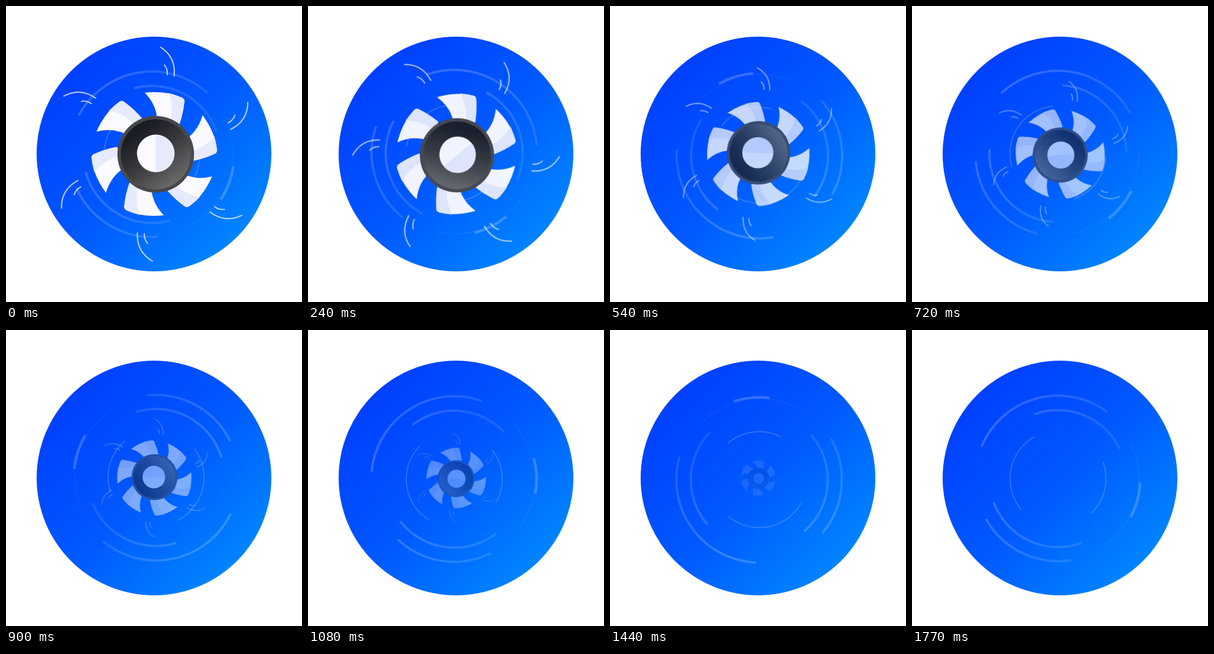
An HTML page for the animation above (1800 ms loop, 512x512 px).

```html
<!DOCTYPE html>
<html lang="en">
<head>
<meta charset="utf-8">
<title>Spinning fan</title>
<style>
  html, body { margin: 0; width: 100%; height: 100%; overflow: hidden; background: #fff; }
  svg { display: block; width: 100vw; height: 100vh; }
  .line { fill: none; stroke: #fff; }
</style>
</head>
<body>
<svg viewBox="0 0 512 512">
  <defs>
    <linearGradient id="sky" x1="0" y1="0" x2="1" y2="1">
      <stop offset="0" stop-color="#0036ff"/>
      <stop offset=".5" stop-color="#0058ff"/>
      <stop offset="1" stop-color="#0096ff"/>
    </linearGradient>
    <linearGradient id="fade" gradientUnits="userSpaceOnUse" x1="-144" y1="-30" x2="130" y2="30">
      <stop offset="0" stop-color="#fff" stop-opacity=".2"/>
      <stop offset="1" stop-color="#fff" stop-opacity=".08"/>
    </linearGradient>
    <linearGradient id="bowl" x1=".2" y1=".1" x2=".8" y2=".9">
      <stop offset=".1" stop-color="#1b1d25"/>
      <stop offset=".5" stop-color="#38393c"/>
      <stop offset="1" stop-color="#6a6a6b"/>
    </linearGradient>
    <g id="blade">
      <path fill="#fbfaff" d="M-16.5-106Q20-110 48-97.5Q53-95 52-90Q50-70 43-50L5-50Q7-82-16.5-106Z"/>
      <path fill="#e6eafc" d="M25-105.5Q38-102 48-97.5Q53-95 52-90Q50-70 43-50L26-50Q35-80 25-105.5Z"/>
    </g>
    <g id="flick" class="line" stroke-width="1.8" stroke-linecap="round">
      <path d="M11-185Q38-168 35-135"/>
      <path d="M18-154Q24-147 23-137"/>
    </g>
  </defs>

  <circle cx="256" cy="256" r="203" fill="url(#sky)"/>
  <g id="rings"></g>
  <g id="flicks"></g>
  <g id="fan">
    <g id="blades"></g>
    <circle cx="2.5" cy=".5" r="66.3" fill="#48484a"/>
    <circle cx="2.5" cy=".5" r="60.5" fill="url(#bowl)"/>
    <circle cx="2.5" cy="-1" r="32.5" fill="#fbfaff"/>
    <path d="M2.5-33.5a32.5 32.5 0 0 1 0 65Z" fill="#e6eafc"/>
  </g>
</svg>
<script>
  const LOOP = 1800, SLOT = 30, POSES = 50;
  const $ = id => document.getElementById(id);
  const rings = $('rings'), flicks = $('flicks'), fan = $('fan');

  // Angles run clockwise from the top; the rings sit slightly off the pivot.
  function arc(r, from, to, width, paint) {
    const at = deg => {
      const a = deg * Math.PI / 180;
      return `${(r * Math.sin(a)).toFixed(2)} ${(-r * Math.cos(a)).toFixed(2)}`;
    };
    return `<path class="line" transform="translate(-3.5 1)" style="stroke:${paint}"
      stroke-width="${width}" d="M${at(from)}A${r} ${r} 0 0 1 ${at(to)}"/>`;
  }
  const white = alpha => `rgba(255,255,255,${alpha})`;

  rings.innerHTML = [
    arc(83, 231, 332, 2, white(.18)),
    arc(83, 71, 138, 2, white(.18)),
    arc(118.5, 341, 426, 4, 'url(#fade)'),
    arc(118.5, 161, 251, 4, 'url(#fade)'),
    arc(143.5, 294, 398, 4, 'url(#fade)'),
    arc(142.8, 172, 242, 4, 'url(#fade)'),
    arc(142.5, 94, 119, 4.4, white(.2)),
    arc(140, 66, 146, 1.2, white(.07))
  ].join('');

  const spread = (id, angles) => angles.map(a =>
    `<use href="#${id}" transform="rotate(${a})"/>`).join('');
  $('blades').innerHTML = spread('blade', [0, 60, 120, 180, 240, 300]);
  flicks.innerHTML = spread('flick', [0, 57.7, 121.5, 177.4, 236.3, 299.3]);

  const place = (el, x, y, turn, scale) =>
    el.setAttribute('transform', `translate(${x} ${y}) rotate(${turn}) scale(${scale})`);

  function draw(now) {
    // Five poses per six slots: the first of each group is held twice.
    const slot = Math.floor((now % LOOP) / SLOT);
    const pose = 5 * Math.floor(slot / 6) + Math.max(0, slot % 6 - 1);
    const x = pose / POSES;
    const p = x * x * (3 - 2 * x);

    place(rings, 256, 256, 4 + 1076 * p, 1);
    place(flicks, 256, 256, -840 * p, 1 - .9 * p);
    place(fan, 256.5, 256, 1260 * p, 1 - .8 * p);
    flicks.setAttribute('opacity', .85 * (1 - p));
    fan.setAttribute('opacity', 1 - p);
  }

  const start = performance.now();
  function tick() {
    draw(performance.now() - start);
    requestAnimationFrame(tick);
  }
  tick();
</script>
</body>
</html>
```
